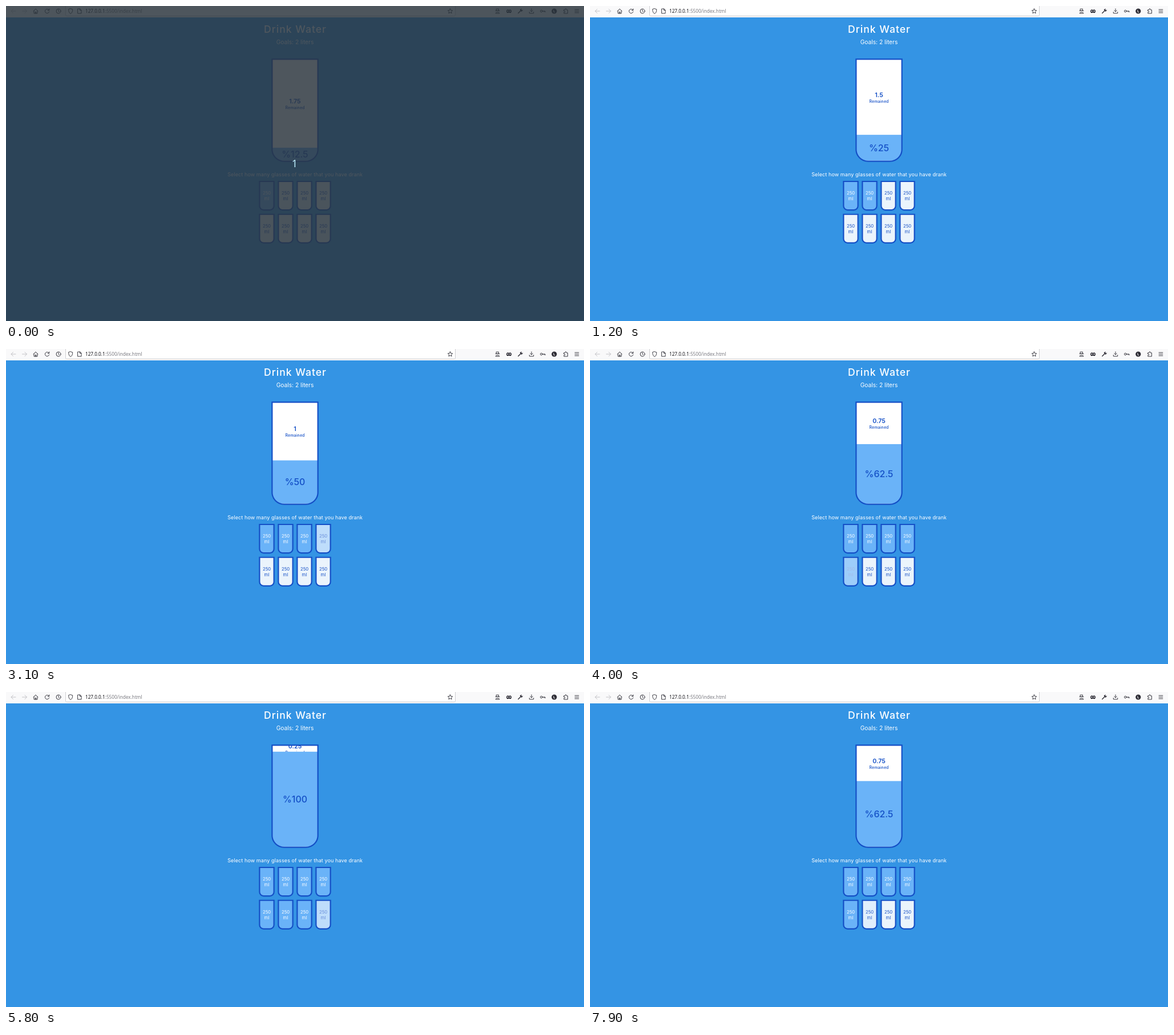
These frames come from a looping animation (1013 px wide and 553 px high, 8 s). An HTML page:

```html
<!DOCTYPE html>
<html lang="en">
<head>
<meta charset="utf-8">
<title>Drink Water</title>
<style>
  html, body { margin: 0; width: 100%; height: 100%; overflow: hidden; background: #3494e4; }
  svg { display: block; width: 100vw; height: 100vh; }
  text { font-family: Inter, sans-serif; text-anchor: middle; }
  .url { font: 8.2px "Noto Sans", sans-serif; text-anchor: start; fill: #7b7b82; }
  .url tspan { fill: #15141a; font-weight: 500; }
  .icons { fill: none; stroke: #3a3a42; stroke-width: 1; stroke-linecap: round; stroke-linejoin: round; }
  .off { stroke: #c3c3c7; }
  .solid { fill: #2b2a33; stroke: none; }
  .ink { fill: #144fc6; }
  .rim { fill: none; stroke: #144fc6; stroke-width: 2.2; }
</style>
</head>
<body>
<svg id="stage" viewBox="0 0 1013 553">
  <rect width="1013" height="553" fill="#3494e4"/>

  <rect width="1013" height="20" fill="#f9f9fa"/>
  <rect x="104.5" y="-3" width="683" height="20.5" rx="2" fill="#fff" stroke="#c2c2c6" stroke-width=".8"/>
  <g class="icons">
    <path class="off" d="M17 9H9M12.5 5.5L9 9l3.5 3.5M28.500 9h8M33 5.500L36.500 9 33 12.500"/>
    <path d="M48 9l4-4 4 4M49 8.500V13h6V8.500M51.200 13v-2.500h1.600V13"/>
    <path d="M75.200 7A3.700 3.700 0 1 0 75.700 10M75.800 5v2.600h-2.600"/>
    <circle cx="92" cy="9" r="4"/><path d="M92 6.500V9l1.600 1.300"/>
    <path d="M113.200 4.700l3.500 1.200c0 4-1 6.400-3.500 7.600c-2.500-1.200-3.500-3.600-3.500-7.600z"/>
    <path d="M126 5h3.700l2.300 2.300V13h-6zM129.500 5v2.500H132"/>
    <path d="M778.500 4.800l1.250 2.700 2.950.35-2.200 2 .6 2.950-2.600-1.500-2.600 1.500.6-2.950-2.200-2 2.950-.35z"/>
    <path d="M859.500 5.200h4v3h-4zM858 8.500h7M858 12.500c.5-2 6.500-2 7 0z"/>
    <path class="solid" fill-rule="evenodd" d="M877 9c0-3 3-3.300 4.500-2c1.500-1.300 4.500-1 4.500 2c0 3.500-3 4-4.500 2.200c-1.500 1.800-4.500 1.300-4.500-2.200zM878.300 9a1.200 1 0 0 0 2.400 0a1.200 1 0 0 0-2.400 0zM882.300 9a1.200 1 0 0 0 2.400 0a1.200 1 0 0 0-2.400 0z"/>
    <path stroke-width="1.600" d="M897.800 12.500l4-4"/><path class="solid" d="M900.500 6.500l2.500-1.800 1 .2-1 1.700 1 1 1.600-1 .1 1.200-2.200 2.200z"/>
    <path d="M921 4.800v5M918.800 7.800l2.200 2.200 2.200-2.200M917.300 10.500v2.300h7.400v-2.300"/>
    <circle cx="938.300" cy="9" r="1.800"/><path d="M940.200 9h4.800v1.700M943 9v1.300"/>
    <circle class="solid" cx="960.800" cy="9" r="4.600"/>
    <path stroke="#fff" stroke-width=".9" d="M959.900 7.200v3.500h2"/>
    <path d="M977.800 6.800h2V6a1.200 1.200 0 0 1 2.400 0v.8h2.200V13h-6.600v-2h.8a1.100 1.100 0 0 0 0-2.200h-.8z"/>
    <path d="M997 6.200h6.800M997 9h6.800M997 11.800h6.800"/>
  </g>
  <text class="url" x="139" y="12"><tspan>127.0.0.1</tspan>:5500/index.html</text>

  <g fill="#fff">
    <text x="507" y="47.200" font-size="17.600" font-weight="500" letter-spacing="1">Drink Water</text>
    <text x="506.500" y="67.300" font-size="10.200">Goals: 2 liters</text>
    <text x="506.700" y="299" font-size="9" letter-spacing=".1">Select how many glasses of water that you have drank</text>
  </g>

  <clipPath id="clip"><path id="clipShape"/></clipPath>
  <path id="back" fill="#fff"/>
  <g clip-path="url(#clip)">
    <g id="remained" class="ink" font-weight="500">
      <text id="liters" x="506.500" y="-.6" font-size="10.700" font-weight="600"></text>
      <text x="506.500" y="9.300" font-size="7" letter-spacing=".12">Remained</text>
    </g>
    <rect id="water" x="465" width="83" fill="#6ab3f8"/>
    <text id="percent" class="ink" x="506.500" font-size="15.900" font-weight="500"></text>
  </g>
  <path id="rim" class="rim"/>
  <g id="cups"></g>

  <g id="countdown">
    <rect width="1013" height="553" fill="#2b343d" opacity=".83"/>
    <text x="506" y="283" font-size="18" fill="#bdeeff" style="font-family:'Noto Sans',sans-serif">1</text>
  </g>
</svg>
<script>
const LOOP = 8000, STEP = 100, FADE = 300;
const TOP = 94.4, INNER = 177.1, FULL = 181.5, MIN_LABEL = 22;
const EMPTY = [235, 244, 252], WATER = [106, 179, 248], INK = [20, 79, 198], WHITE = [255, 255, 255];

// [click time, number of glasses drunk afterwards]
const clicks = [[-FADE, 1], [895, 2], [2095, 3], [3033, 4], [3895, 5], [4595, 6],
  [5195, 7], [5733, 8], [6533, 7], [7295, 6], [7700, 5]];

const $ = id => document.getElementById(id);
const lerp = (a, b, k) => a + (b - a) * k;
const mix = (a, b, k) => `rgb(${a.map((v, i) => Math.round(lerp(v, b[i], k)))})`;
const set = (el, attrs) => { for (const k in attrs) el.setAttribute(k, attrs[k]); return el; };

function add(parent, tag, attrs, text = '') {
  const el = set(document.createElementNS(parent.namespaceURI, tag), attrs);
  el.textContent = text;
  return parent.appendChild(el);
}

// Outline along the middle of the border of a box with round lower corners
function glass(x, y, w, h, r) {
  const b = 1.1, q = r - b;
  return `M${x + b} ${y + b}h${w - 2 * b}v${h - 2 * b - q}a${q} ${q} 0 0 1 ${-q} ${q}` +
    `h${-(w - 2 * b - 2 * q)}a${q} ${q} 0 0 1 ${-q} ${-q}z`;
}

// CSS "ease": cubic-bezier(.25, .1, .25, 1)
function ease(x) {
  if (x <= 0) return 0;
  if (x >= 1) return 1;
  const bez = (s, p, q) => 3 * (1 - s) * (1 - s) * s * p + 3 * (1 - s) * s * s * q + s * s * s;
  let lo = 0, hi = 1;
  for (let i = 0; i < 24; i++) {
    const mid = (lo + hi) / 2;
    if (bez(mid, .25, .25) < x) lo = mid; else hi = mid;
  }
  return bez(lo, .1, 1);
}

const bigGlass = glass(465.25, 92.2, 82.5, 181.5, 22);
for (const id of ['clipShape', 'back', 'rim']) set($(id), { d: bigGlass });

const cups = Array.from({ length: 8 }, (_, i) => {
  const x = 457 + 33 * (i % 4), y = 306.9 + 57.75 * (i >> 2);
  const shape = add($('cups'), 'path', { class: 'rim', d: glass(x - 13.75, y, 27.5, 52.25, 8.25) });
  const label = add($('cups'), 'g', { 'font-size': 7.7 });
  add(label, 'text', { x, y: y + 24.2 }, '250');
  add(label, 'text', { x, y: y + 34, 'letter-spacing': .3 }, 'ml');
  return { shape, label };
});

function draw(ms) {
  const t = Math.floor(ms / STEP) * STEP;
  const n = clicks.findLastIndex(c => c[0] <= t);
  const [start, to] = clicks[n];
  const from = n ? clicks[n - 1][1] : to;
  const k = ease((t - start) / FADE);

  // The label keeps its own height until the glass is full
  const gap = INNER - FULL * lerp(from, to, k) / 8;
  const white = Math.max(to === 8 ? 0 : MIN_LABEL, gap);
  const level = INNER - white;
  set($('water'), { y: TOP + white, height: level });
  set($('percent'), { y: TOP + white + level / 2 + 5.8 }).textContent = '%' + to * 12.5;
  set($('remained'), {
    transform: `translate(0 ${TOP + white / 2})`,
    visibility: to === 8 && k === 1 ? 'hidden' : 'visible'
  });
  $('liters').textContent = 2 - Math.min(to, 7) * .25;

  cups.forEach(({ shape, label }, i) => {
    const f = lerp(+(i < from), +(i < to), k);
    shape.style.fill = mix(EMPTY, WATER, f);
    label.style.fill = mix(INK, WHITE, f);
  });
  set($('countdown'), { visibility: t < STEP ? 'visible' : 'hidden' });
}

const begin = performance.now();
function tick() {
  draw((performance.now() - begin) % LOOP);
  requestAnimationFrame(tick);
}
tick();
</script>
</body>
</html>
```
